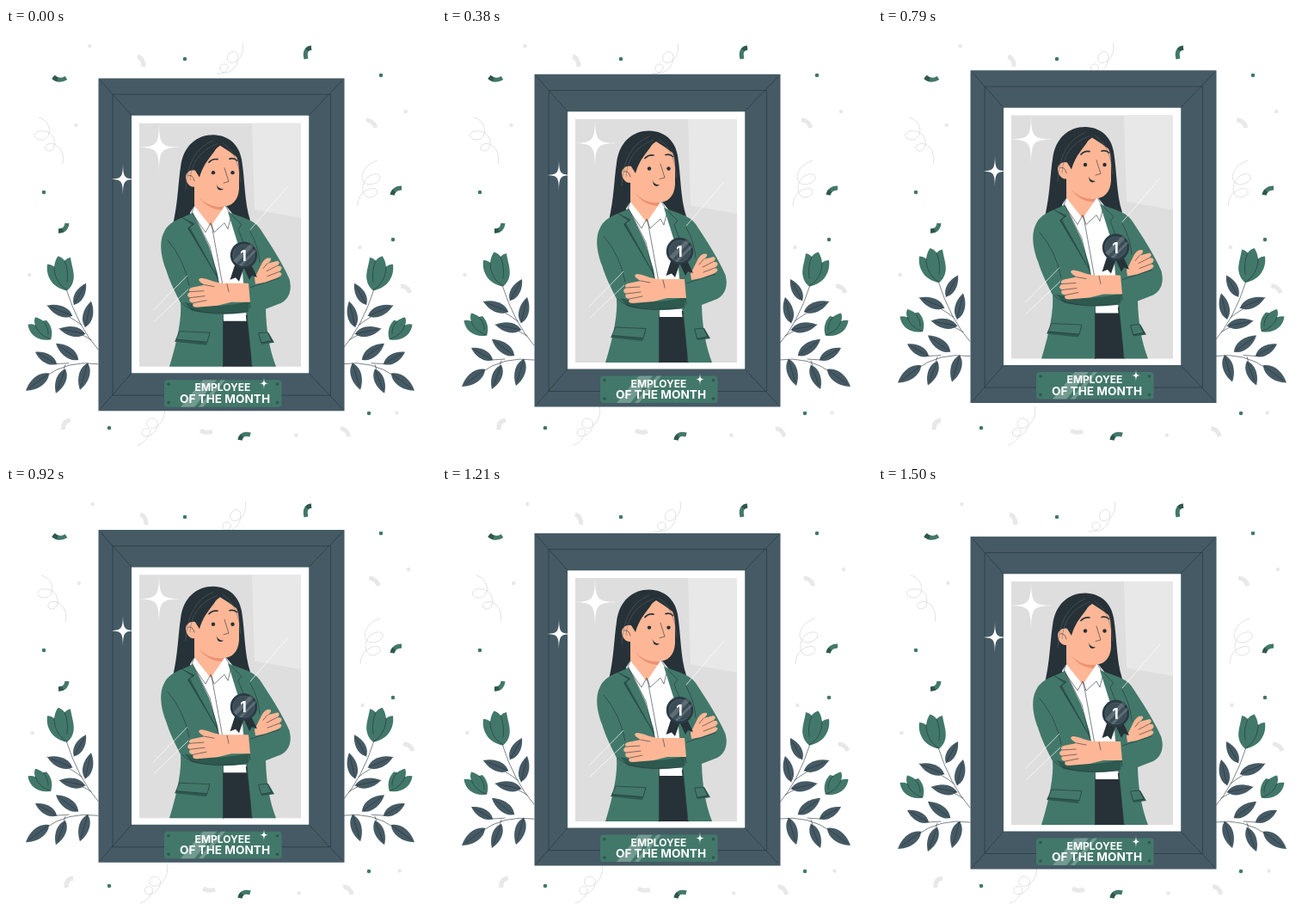
Recreate the animation shown at these times as an HTML page. Size 500 by 500 pixels, loop 1.54 s.

```html
<!DOCTYPE html>
<html lang="en">
<head>
<meta charset="utf-8">
<title>Employee of the month</title>
<style>
html, body { margin: 0; width: 100%; height: 100%; overflow: hidden; background: #fff; }
svg { display: block; width: 100vw; height: 100vh; }
.green { fill: #42786a; }
.dark { fill: #263238; }
.slate { fill: #455a64; }
.skin { fill: #feb796; }
.white { fill: #fff; }
.shade { fill: #2d594e; }
.ink { fill: none; stroke: #263238; stroke-width: .6; stroke-linecap: round; stroke-linejoin: round; }
.brow { stroke-width: 1.7; }
.glare { fill: none; stroke: #fff; stroke-width: .7; }
.curl { fill: none; stroke: #d4d4d4; stroke-width: .7; }
.bit { fill: none; stroke-width: 5; }
text { font-family: Montserrat, Inter, sans-serif; font-weight: 700; fill: #fff; text-anchor: middle; }
</style>
</head>
<body>
<svg viewBox="0 0 500 500">
  <g id="shaking">
    <g class="curl">
      <path d="M38 104C54 108 54 129 42 130C30 130 31 118 44 120C60 121 60 143 50 143C42 142 46 132 56 135C66 139 68 150 66 158"/>
      <path d="M275 18C279 33 264 46 258 38C255 28 270 22 270 35C268 52 252 56 249 48C248 40 260 40 258 48Q253 54 245 53"/>
      <path d="M432 154C412 160 408 182 424 182C438 180 438 168 428 170C414 172 410 194 422 197C436 196 434 184 424 187C412 190 409 200 409 207"/>
      <path d="M184 440C188 458 170 472 164 462C162 450 180 452 176 464C172 476 158 478 158 470C160 462 172 466 166 474Q160 484 153 485"/>
    </g>
    <g id="greyBits"></g>
  </g>
  <g id="greenBits"></g>

  <g id="floating">
    <g id="plant">
      <path class="ink" d="M70 304Q84 348 107 374M107 391Q72 386 45 406M57 391L73 390M64 407L69 392M48 323Q76 336 88 346M62 350Q84 353 99 363"/>
      <g id="leaves"></g>
      <path class="green" d="M71 305.500C55 303 46 290 48 275Q53 275 56 278Q57 270 60.500 265.500Q66 267 68 271Q71 267.500 75 267C76 275 80 285 78.500 293Q77 301 71 305.500Z"/>
      <path class="ink" d="M56 278C56 290 62 300 71 305M68 271Q73 282 71 296"/>
      <path class="green" d="M52 362.500C39 365 27 358 25.500 345Q30 344 34 346Q32 341 34 336.500Q40 338 43 341L47 340C53 346 55 355 52 362.500Z"/>
      <path class="ink" d="M34 346Q38 358 52 362M43 341Q50 349 49 356"/>
    </g>
    <use href="#plant" transform="matrix(-1 0 0 1 498 0)"/>

    <path class="slate" d="M107.500 58.800H393.500V445.500H107.500Z"/>
    <path class="ink" d="M124.500 77.500H377.500V427.500H124.500ZM110 61.500L146 102M391 61.500L352 102M110 443L146 401.500M391 443L352 401.500"/>
    <path class="white" d="M146 102.200H352.200V401.500H146Z"/>
    <path fill="#dedede" d="M155 111H343V394H155Z"/>
    <path fill="#e8e8e8" d="M286 111H343V221L289 211.500Z"/>

    <!-- hair, neck and face -->
    <path class="dark" d="M194 229C200 203 200 182 203 162C206 137 222 124.500 241 124.500C259 125 271 136 274 153C278 178 277 202 284 224L260 232L210 232Z"/>
    <path class="skin" d="M219 180L219 212L238 235L258 222L254 201Z"/>
    <path fill="#ed9272" d="M224 196Q232 207 249 208L254 207L255 212Q235 213 224 196Z"/>
    <path class="skin" d="M249 137C241 143 231 151 224 168C219 163 209 166 209 174C210 183 216 187 222 184C225 199 234 207 247 208C262 209 270 202 271 187C271 172 272 158 268 150Q259 143 249 137Z"/>
    <path class="dark" d="M246 136C243 147 231 153 225 174L220 166Q227 142 246 136Z"/>
    <path class="ink" d="M212 172Q217 170 219 178M254 163L259 179L253 180.500"/>
    <path class="ink brow" d="M236 156.500Q240 152 246 153M260 152.500Q265 151 268.500 154.500"/>
    <circle class="dark" cx="241" cy="168.500" r="2.200"/>
    <circle class="dark" cx="263.500" cy="168.500" r="2.200"/>
    <path class="dark" d="M244.500 181.500Q246 187 253 187.500Q249 190.500 246 187Z"/>
    <path fill="none" stroke="#59656a" stroke-width=".5" d="M246 135Q216 146 214 178M241 131Q211 143 209 188M252 134Q271 146 273 180"/>

    <!-- clothes -->
    <path class="dark" d="M252 334H283L286 394H252Z"/>
    <path class="white" d="M219 207L238 231L255 206L268 222L279.500 341H253L228 262L214 215Z"/>
    <path class="ink" d="M219 207L216 215L232 238L238 227L242 238L254 227L258 234L262 218L255 207M239 229L252 300"/>
    <path class="green" d="M217 215C206 221 190 224 184 237C177 250 181 268 186 281C191 297 197 308 203 320Q205 345 190 394H252.500V326L246 286L236 254Z"/>
    <path class="green" d="M258 214C272 220 287 222 295 233C307 251 321 273 329 291C333 303 330 315 320 320L302 327Q303 366 314 394H286L279 325L273 262Z"/>
    <path class="shade" d="M205 221L219 228L214 232L247 292L211 233L216 229Z"/>
    <path class="ink" d="M217 215L237 254L248 300M205 221L219 228L212 233L246 291M188 247Q207 269 213 300M263 218L274 229L270 234L277 252M284 237Q294 255 295 273"/>
    <path class="green" d="M200 307Q202 325 216 330Q244 336 280 331L281 314L216 314Z"/>
    <path class="shade" d="M207 319Q242 328 283 318L282 330Q244 335 216 329Z"/>
    <path class="green" d="M281 297L304 293L329 291Q334 310 320 319Q303 326 284 326Z"/>
    <path class="ink" d="M281 297L284 326M284 302L318 291M205 320Q211 330 245 332.500L280 331M252.500 333V394M280 332L286 394"/>
    <path class="shade" d="M202 354L237 356L233 369L196 365ZM294 355L305 354L312 366L297 368Z"/>
    <path class="green" d="M202 353L237 354.500L234 365.500L198 362.500ZM294 355L304 354L309 364L297 366Z"/>
    <path class="ink" d="M202 353L237 354.500L234 365.500L198 362.500ZM294 355L304 354L309 364L297 366Z"/>

    <!-- hands -->
    <path class="skin" d="M289 291L298 273Q303 266 308 268Q309 271 304 274L316 271Q320 273 315 277L319 277Q323 280 317 284L320 285Q322 288 315 291L301 296L290 298Z"/>
    <path class="ink" d="M304 274L299 280M315 277L303 283M317 284L304 289"/>
    <path class="skin" d="M282 297L258 297C245 298 236 292 227 291C222 292 224 295 231 299L216 302Q211 304 214 307Q208 311 214 314Q211 319 218 320Q215 325 222 325L246 323Q254 321 262 319L284 319Z"/>
    <path class="ink" d="M231 299L242 301M214 307L230 306M214 314L231 312M218 320L233 317M257 298L259 307"/>

    <!-- rosette -->
    <path class="dark" d="M267 273L260.500 293L267 290.500L271 295L276.500 279L283 293L286 288L292 290L284 273Z"/>
    <circle cx="276.500" cy="264.500" r="15.700" fill="#2b3a43"/>
    <circle cx="276.500" cy="264.500" r="12.500" fill="#3b4d57" stroke="#566873" stroke-width=".6"/>
    <path fill="#fff" opacity=".18" d="M264 271L284 251L288 254L268 274ZM271 276L290 257L291 260L274 277Z"/>
    <text x="276" y="271" font-size="17.500">1</text>

    <path class="glare" d="M284 235L328 184M171 329L211 288M172 342L212 304"/>

    <!-- name plate -->
    <rect class="green" x="184" y="409.500" width="136.500" height="31.500" rx="3.500"/>
    <path fill="#fff" opacity=".25" d="M203 441L229 409.500H245L219 441ZM224 441L250 409.500H255L229 441Z"/>
    <g id="screws" class="shade"></g>
    <text x="252" y="422.500" font-size="12">EMPLOYEE</text>
    <text x="254.500" y="436" font-size="13.600">OF THE MONTH</text>
    <g id="stars" class="white"></g>
  </g>
</svg>
<script>
const $ = id => document.getElementById(id);

function add(parent, tag, attrs) {
  const el = document.createElementNS("http://www.w3.org/2000/svg", tag);
  for (const key in attrs) el.setAttribute(key, attrs[key]);
  $(parent).append(el);
}
const dot = (parent, x, y, r, fill) => add(parent, "circle", { cx: x, cy: y, r, ...(fill && { fill }) });
const arc = (parent, d, stroke, extra) => add(parent, "path", { class: "bit", d, stroke, ...extra });

// Leaf from base to tip, with a midrib
function leaf(x1, y1, x2, y2) {
  const dx = x2 - x1, dy = y2 - y1;
  const at = (u, v) => `${x1 + dx * u - dy * v} ${y1 + dy * u + dx * v}`;
  add("leaves", "path", {
    class: "slate",
    d: `M${x1} ${y1}C${at(.2, .25)} ${at(.65, .25)} ${x2} ${y2}C${at(.65, -.25)} ${at(.2, -.25)} ${x1} ${y1}`
  });
  add("leaves", "path", { class: "ink", d: `M${x1} ${y1}L${at(.85, 0)}` });
}

// Four thin concave arms
function star(x, y, rx, ry) {
  const at = (u, v) => `${x + rx * u} ${y + ry * v} `;
  const side = (sx, sy) => at(.02 * sx, .1 * sy) + at(.1 * sx, .02 * sy);
  const back = (sx, sy) => at(.1 * sx, .02 * sy) + at(.02 * sx, .1 * sy);
  add("stars", "path", {
    d: `M${at(0, -1)}C${side(1, -1)}${at(1, 0)}C${back(1, 1)}${at(0, 1)}` +
       `C${side(-1, 1)}${at(-1, 0)}C${back(-1, -1)}${at(0, -1)}Z`
  });
}

[[79, 322, 93, 297], [77, 335, 48, 323], [92, 348, 99, 318], [92, 356, 62, 350],
 [59, 391, 34, 377], [84, 386, 58, 367], [50, 402, 23, 422], [69, 397, 58, 425],
 [95, 390, 86, 421]].forEach(p => leaf(...p));

star(178, 139, 25, 28);
star(136, 176, 16, 18);
star(300, 413.5, 7, 8);

for (const x of [189, 315.5]) for (const y of [414.5, 436]) dot("screws", x, y, 1.8);

const GREY = "#e8e8e8", GREEN = "#42786a";
[[97.5, 21], [81.5, 113], [465, 97], [27.5, 287], [411.5, 255], [454.5, 447.5], [337.5, 473.5]]
  .forEach(([x, y]) => dot("greyBits", x, y, 2.2, GREY));
["M153 33Q160 35 160 45", "M419 107Q427 107 430 116", "M459 300Q467 300 470 308",
 "M67 467Q66 457 75 456", "M389 466Q396 465 399 475", "M226 468Q233 472 240 469"]
  .forEach(d => arc("greyBits", d, GREY));

[[208, 36], [436, 55], [44, 191], [450, 246], [120, 465], [422, 448]]
  .forEach(([x, y]) => dot("greenBits", x, y, 2.3, GREEN));
["M55 57Q62 63 70 58", "M355 23Q346 24 349 36", "M449 194Q451 186 460 186",
 "M61 236Q70 236 71 227", "M272 479Q274 470 284 473"].forEach(d => {
  arc("greenBits", d, GREEN);
  arc("greenBits", d, "#2f574d", { pathLength: 10, "stroke-dasharray": "3.5 20" });
});

const LOOP = 1540, CYCLE = 1500, STEP = 1000 / 24;
const SHAKE = [0, -1, 2, -4, 4, -4, 4, -4, 2, -1, 0];

function draw(now) {
  const step = Math.floor((now % LOOP + 5) / STEP) % 37;
  const phase = Math.max(step, .6) * STEP / CYCLE % 1;
  const rise = -10 * (1 - Math.abs(1 - 2 * phase));
  const i = Math.min(9, Math.floor(phase * 10));
  const sway = SHAKE[i] + (SHAKE[i + 1] - SHAKE[i]) * (phase * 10 - i);
  $("floating").setAttribute("transform", `translate(0 ${rise})`);
  $("shaking").setAttribute("transform", `translate(${sway} 0)`);
}

let start;
function tick(now) {
  start ??= now;
  draw(now - start);
  requestAnimationFrame(tick);
}
draw(0);
requestAnimationFrame(tick);
</script>
</body>
</html>
```
